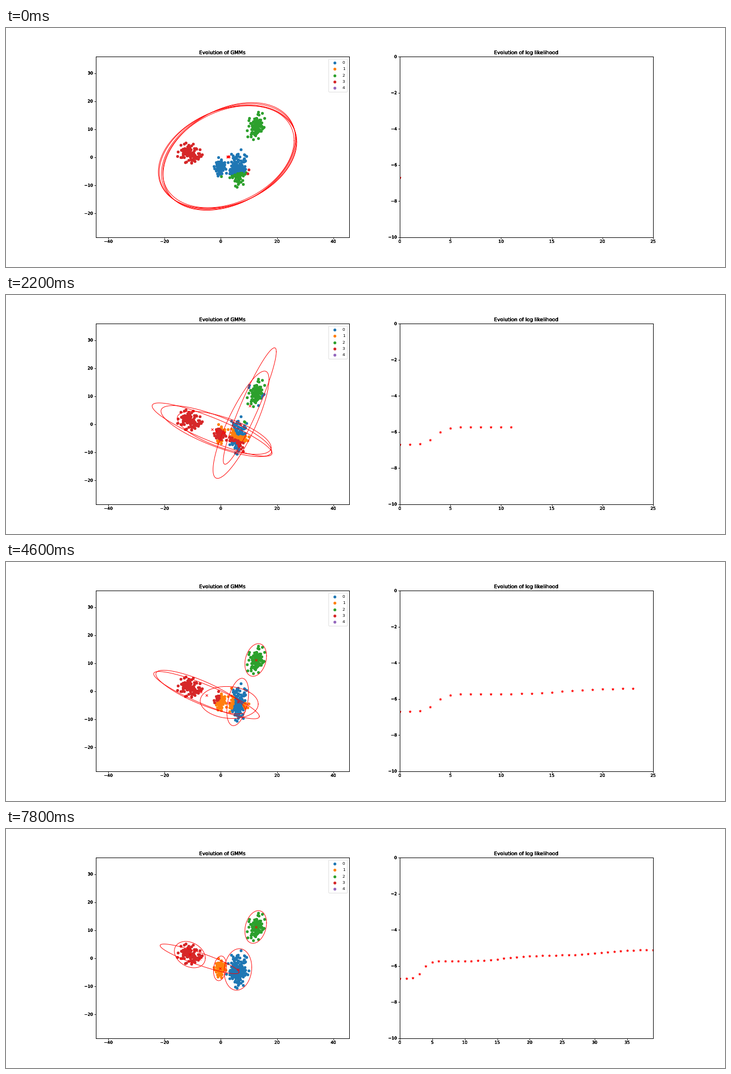
A matplotlib script for the animation above (8000 ms loop, 1280 px wide and 427 px high).

```python
import numpy as np
import matplotlib.pyplot as plt
import matplotlib.patheffects as pe
from matplotlib.animation import FuncAnimation

W, H, DPI = 1280, 427, 160 / 3
FRAMES, INTERVAL = 40, 200
rng = np.random.default_rng(8)


def ease(k, begin, end):
    t = np.clip((k - begin) / (end - begin), 0, 1)
    return t * t * (3 - 2 * t)


def logistic(k, centre, width):
    return 1 / (1 + np.exp((centre - k) / width))


def pose(cx, cy, hx, hy, r):
    """Mean and covariance of the ellipse with half sizes hx, hy and correlation r."""
    return np.array([cx, cy, hx * hx, hy * hy, r * hx * hy])


def shape(state):
    cx, cy, vx, vy, vxy = state
    hx, hy = np.sqrt(vx), np.sqrt(vy)
    return cx, cy, hx, hy, vxy / (hx * hy)


def start(lean, scale=1):
    """Near copy of the whole data's ellipse: tall for lean > 0, wide for lean < 0."""
    return pose(2.7 + 0.3 * lean, 0.2 + 0.1 * lean, scale * (24.05 - 0.55 * lean),
                scale * (18.75 + 0.45 * lean), 0.315 + 0.025 * lean)


def sample(n, state):
    """Normal points of one cluster; its ellipse lies at three sigma."""
    cx, cy, hx, hy, r = shape(state)
    z = rng.normal(size=(2 * n, 2))
    u, v = z[np.hypot(*z.T) < 2.9][:n].T
    return np.column_stack([cx + hx * u / 3,
                            cy + hy * (r * u + np.sqrt(1 - r * r) * v) / 3])


west = pose(-11, 1.3, 5.5, 4.7, -0.27)
middle = pose(-0.3, -3.6, 2.3, 4.4, 0.2)
south = pose(6.1, -4, 4.9, 7.4, 0.1)
north = pose(12.4, 11.15, 3.85, 5.83, 0.25)
points = np.vstack([sample(n, s) for n, s in
                    ((100, west), (100, middle), (200, south), (100, north))])

# Per component: first state, then moves as (begin, end, state)
tracks = [
    (start(0, 0.97), [(1, 6, pose(7.4, 0.5, 10.7, 20.5, 0.85)),
                      (10, 14, pose(6, -3.8, 3.7, 8.6, 0.45)),
                      (18, 40, south)]),
    (start(-0.6), [(1, 6, pose(-2, -2.3, 21.5, 9.3, -0.87)),
                   (8, 14, pose(4.4, -3.8, 9.7, 5.6, 0)),
                   (16, 23, pose(3, -4, 10.3, 5.7, -0.1)),
                   (25, 37, middle)]),
    (start(1), [(1, 6, pose(9.7, 5.2, 10, 22.4, 0.94)),
                (7, 15, pose(10.9, 7.8, 8.8, 19, 0.92)),
                (15, 19, north)]),
    (start(-1), [(1, 6, pose(-2.2, -2.2, 21.7, 9.4, -0.87)),
                 (7, 15, pose(-4, -1.6, 20.9, 9.6, -0.9)),
                 (16, 31, west)]),
    (start(0.3), [(1, 6, pose(1, -3.1, 19.1, 8.9, -0.65)),
                  (7, 15, pose(-4.2, -1.8, 20.2, 9.3, -0.9)),
                  (14, 41, pose(-7.6, -0.2, 13.9, 5.2, -0.9))]),
]

steps = np.arange(FRAMES)
log_lik = (-6.7 + 0.96 * logistic(steps, 3.55, 0.5)
           + 0.33 * logistic(steps, 16.3, 2) + 0.3 * logistic(steps, 31, 2))


def ellipse_at(track, k):
    state, moves = track
    for begin, end, goal in moves:
        state = state + (goal - state) * ease(k, begin, end)
    return shape(state)


def density(ellipse):
    cx, cy, hx, hy, r = ellipse
    u = 3 * (points[:, 0] - cx) / hx
    v = 3 * (points[:, 1] - cy) / hy
    q = 1 - r * r
    return np.exp(-(u * u + v * v - 2 * r * u * v) / (2 * q)) / (hx * hy * np.sqrt(q))


def labels_at(k, ellipses):
    rise = ease(k, 7, 13)
    dip = 0.65 * (ease(k, 0, 7) - rise)
    weights = [1 - dip, 0.35 + 0.65 * rise, 1, 1 + 0.1 * ease(k, 1, 6), 0.5 * (1 - rise)]
    return np.argmax([w * density(e) for w, e in zip(weights, ellipses)], axis=0)


plt.rcParams.update({"axes.linewidth": 1.3, "xtick.major.width": 1.1,
                     "ytick.major.width": 1.1})
fig, (left, right) = plt.subplots(1, 2, figsize=(W / DPI, H / DPI), dpi=DPI)
fig.subplots_adjust(left=0.125, right=0.9, bottom=0.125, top=0.88, wspace=0.2)

left.set_title("Evolution of GMMs")
left.set_xticks(range(-40, 41, 20))
left.set_yticks(range(-20, 31, 10))
left.set_xlim(-44.39, 45.61)
left.set_ylim(-28.48, 35.86)
right.set_title("Evolution of log likelihood")
right.set_xticks(range(0, FRAMES, 5))
right.set_yticks(range(-10, 1, 2))
right.set_xlim(0, 25)
right.set_ylim(-10, 0)

# Repeated drawing gives the text its heavy edges
for ax in (left, right):
    for text in [ax.title, *ax.get_xticklabels(), *ax.get_yticklabels()]:
        text.set_path_effects([pe.Normal()] * 4)

dots = [left.scatter([], [], color=f"C{i}", label=str(i), zorder=1) for i in range(5)]
rings = [left.plot([], [], color="red", lw=1.25, zorder=1.5)[0] for _ in range(5)]
centres, = left.plot([], [], "x", color="red", mew=1.3, zorder=2)
stars, = right.plot([], [], "*", color="red")
left.legend(loc="upper right", labelspacing=0.7, borderpad=0.5)

angle = np.linspace(0, 2 * np.pi, 200)
cos, sin = np.cos(angle), np.sin(angle)


def update(k):
    ellipses = [ellipse_at(t, k) for t in tracks]
    labels = labels_at(k, ellipses)
    for i, (cx, cy, hx, hy, r) in enumerate(ellipses):
        dots[i].set_offsets(points[labels == i])
        rings[i].set_data(cx + hx * cos, cy + hy * (r * cos + np.sqrt(1 - r * r) * sin))
    centres.set_data([e[0] for e in ellipses], [e[1] for e in ellipses])
    stars.set_data(steps[:k + 1], log_lik[:k + 1])
    right.set_xlim(0, max(25, k))
    return [*dots, *rings, centres, stars]


anim = FuncAnimation(fig, update, frames=FRAMES, interval=INTERVAL,
                     init_func=lambda: update(0), repeat=True, repeat_delay=0)
plt.show()
```
